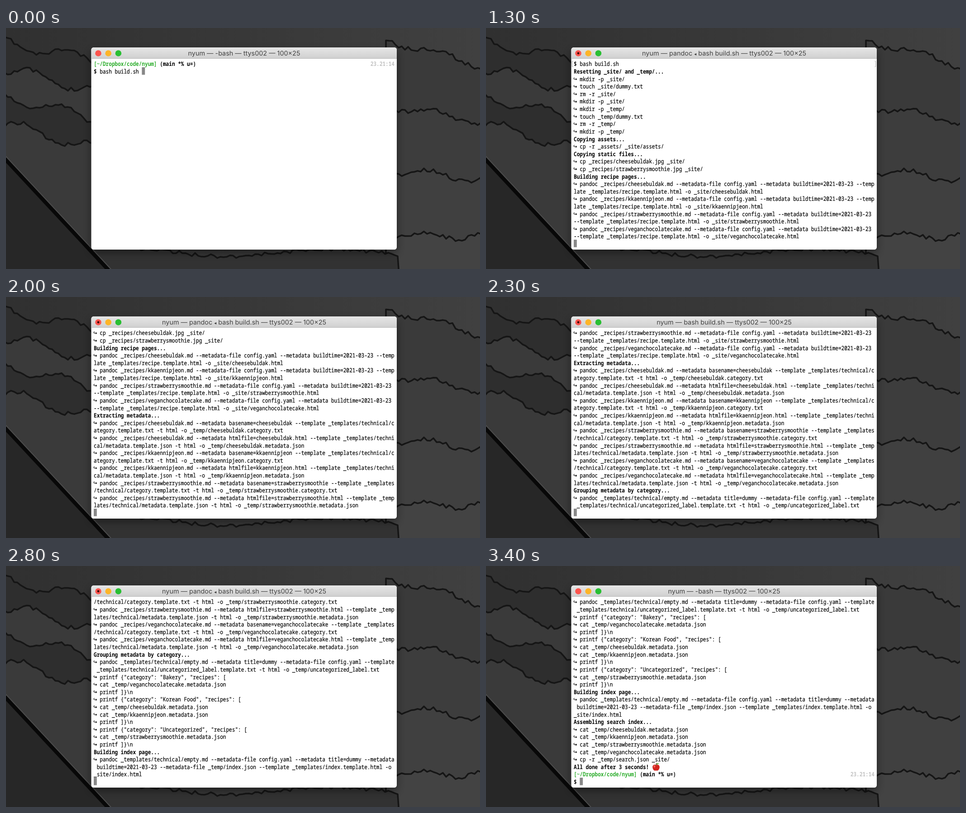
Animation, 1048 px wide and 534 px high, one loop 4400 ms. Source, as an HTML page:

```html
<!DOCTYPE html>
<html lang="en">
<head>
<meta charset="utf-8">
<title>Terminal build</title>
<style>
html, body { margin: 0; width: 100%; height: 100%; overflow: hidden; background: #353535; }
svg { display: block; width: 1048px; height: 534px; }
text { white-space: pre; text-rendering: geometricPrecision; }
#lines text { font: 11.083px "Noto Sans Mono", "DejaVu Sans Mono", monospace; fill: #000; stroke: #000; stroke-width: .18; }
#lines .bold, #lines .path, #lines .time { font-weight: 700; stroke: none; }
#lines .path { fill: #2fae2f; }
#lines .time { fill: #c2c2c2; }
#title { font: 14.4px Inter, Roboto, sans-serif; fill: #404040; text-anchor: middle; }
#title .tri { font: 10px "DejaVu Sans", sans-serif; }
</style>
</head>
<body>
<svg viewBox="0 0 1048 534" xmlns="http://www.w3.org/2000/svg">
  <defs>
    <linearGradient id="rock">
      <stop offset="0" stop-color="#303030"/>
      <stop offset="1" stop-color="#404040"/>
    </linearGradient>
    <linearGradient id="bar" x2="0" y2="1">
      <stop offset="0" stop-color="#e6e6e6"/>
      <stop offset="1" stop-color="#cfcfcf"/>
    </linearGradient>
    <filter id="blur" x="-10%" y="-10%" width="120%" height="125%">
      <feGaussianBlur stdDeviation="9"/>
    </filter>
  </defs>
  <rect width="1048" height="534" fill="url(#rock)"/>
  <g id="slabs" stroke-linejoin="round"></g>
  <rect x="188.5" y="51" width="675.5" height="446" rx="6" opacity=".45" filter="url(#blur)"/>
  <rect x="188.5" y="43" width="675.5" height="448" rx="5.5" fill="#fff"/>
  <path d="M188.5 68V48.5a5.5 5.5 0 0 1 5.5-5.5H858.5a5.5 5.5 0 0 1 5.5 5.5V68Z" fill="url(#bar)"/>
  <path d="M188.5 67.5H864" stroke="#b4b4b4"/>
  <g id="buttons"></g>
  <circle id="dot" cx="204" cy="56" r="2.4" fill="#3d0505"/>
  <text id="title" x="526.5" y="61.2"></text>
  <g id="lines"></g>
  <rect id="cursor" width="6.8" height="16.6" fill="#888"/>
</svg>
<script>
const NS = 'http://www.w3.org/2000/svg';
const $ = id => document.getElementById(id);
const LOOP = 4400, TICK = 100, COLS = 100, ROWS = 25;
const CW = 6.65, LH = 16.61, LEFT = 194, BASE = 84.4;

function add(parent, tag, attrs, text) {
  const el = document.createElementNS(NS, tag);
  for (const k in attrs) el.setAttribute(k, attrs[k]);
  if (text !== undefined) el.textContent = text;
  parent.appendChild(el);
  return el;
}

['#fc544d', '#fdb528', '#29bf33'].forEach((fill, i) =>
  add($('buttons'), 'circle', { cx: 204 + i * 22.2, cy: 56, r: 6.8, fill }));

// ---- rock backdrop: overlapping flat slabs with rough upper edges
let seed = 11;
const rand = () => (seed = (seed * 16807) % 2147483647) / 2147483647 - 0.5;

function slab(x0, y0, x1, y1, tone, wave) {
  let d = `M${x0} 560`;
  for (let x = x0; x <= x1; x += 7) {
    const f = (x - x0) / (x1 - x0);
    const y = y0 + (y1 - y0) * f + wave * Math.sin(f * 9 + y0) + rand() * 9;
    d += `L${x} ${y.toFixed(1)}`;
  }
  add($('slabs'), 'path', {
    d: d + `L${x1} 560Z`, fill: `rgb(${tone},${tone},${tone})`, stroke: '#151515', 'stroke-width': 3.5 });
}

for (let i = 0; i < 4; i++) {
  slab(-10, 30 + i * 60, 210, 75 + i * 65, i % 2 ? 58 : 46, 12);
  slab(840, 25 + i * 145, 1060, 85 + i * 125, 58 + i * 3, 8);
}
slab(180, 494, 870, 500, 50, 9);
add($('slabs'), 'path', { d: 'M-20 273L250 560H-20Z', fill: '#272727' });
add($('slabs'), 'path', { d: 'M-10 281L236 546', stroke: '#080808', 'stroke-width': 9 });
add($('slabs'), 'path', { d: 'M-10 274L243 546', stroke: '#4c4c4c', 'stroke-width': 2 });

// ---- transcript
const foods = ['cheesebuldak', 'kkaennipjeon', 'strawberrysmoothie', 'veganchocolatecake'];
const [cheese, kkaennip, berry, cake] = foods;
const tpl = '_templates/', tech = tpl + 'technical/';
const rows = [];
const idle = '-bash', self = 'bash build.sh';
let proc = self;

const head = s => rows.push({ s, proc, bold: true, first: true });
function run(cmd) {
  const s = '  ' + cmd, name = cmd.split(' ')[0];
  proc = name === 'printf' ? self : `${name} ◂ ${self}`;
  for (let i = 0; i < s.length; i += COLS) rows.push({ s: s.slice(i, i + COLS), proc, first: i === 0, arrow: i === 0 });
}
const pandoc = (file, rest) => run(`pandoc ${file}.md --metadata${rest}`);
const cat = name => run(`cat _temp/${name}.metadata.json`);
function reset(dir) {
  [`mkdir -p ${dir}`, `touch ${dir}dummy.txt`, `rm -r ${dir}`, `mkdir -p ${dir}`].forEach(run);
}
function group(label, names) {
  run(`printf {"category": "${label}", "recipes": [`);
  names.forEach(cat);
  run('printf ]}\\n');
}

rows.push({ prompt: true, first: true });
rows.push({ dollar: true, first: true, s: '  bash build.sh', proc: idle, marks: true });
head('Resetting _site/ and _temp/...');
reset('_site/');
reset('_temp/');
head('Copying assets...');
run('cp -r _assets/ _site/assets/');
head('Copying static files...');
[cheese, berry].forEach(n => run(`cp _recipes/${n}.jpg _site/`));
head('Building recipe pages...');
foods.forEach(n => pandoc('_recipes/' + n,
  `-file config.yaml --metadata buildtime=2021-03-23 --template ${tpl}recipe.template.html -o _site/${n}.html`));
head('Extracting metadata...');
foods.forEach(n => {
  pandoc('_recipes/' + n, ` basename=${n} --template ${tech}category.template.txt -t html -o _temp/${n}.category.txt`);
  pandoc('_recipes/' + n, ` htmlfile=${n}.html --template ${tech}metadata.template.json -t html -o _temp/${n}.metadata.json`);
});
head('Grouping metadata by category...');
pandoc(tech + 'empty', ` title=dummy --metadata-file config.yaml --template ${tech}uncategorized_label.template.txt -t html -o _temp/uncategorized_label.txt`);
group('Bakery', [cake]);
group('Korean Food', [cheese, kkaennip]);
group('Uncategorized', [berry]);
head('Building index page...');
pandoc(tech + 'empty', `-file config.yaml --metadata title=dummy --metadata buildtime=2021-03-23 --metadata-file _temp/index.json --template ${tpl}index.template.html -o _site/index.html`);
head('Assembling search index...');
foods.forEach(cat);
run('cp -r _temp/search.json _site/');
rows.push({ s: 'All done after 3 seconds!', first: true, bold: true, apple: true });
rows.push({ prompt: true, first: true });
rows.push({ dollar: true, first: true });
const LAST = rows.length - 1;

function apple(g) {
  const a = add(g, 'g', { transform: 'translate(182 -4.6)' });
  add(a, 'path', { d: 'M0-4C-3-6.2-8-4.6-7.8.6C-7.6 5-4.6 8.6-2.4 8.3Q0 7.6 2.4 8.3C4.6 8.6 7.6 5 7.8.6C8-4.6 3-6.2 0-4Z', fill: '#d3251f' });
  add(a, 'ellipse', { cx: -3.6, cy: -1.2, rx: 2, ry: 2.6, fill: '#f0695a' });
  add(a, 'path', { d: 'M0-3.4Q-.2-6.5 1.2-8.6', fill: 'none', stroke: '#6b3a1e', 'stroke-width': 1.3 });
  add(a, 'path', { d: 'M.4-5.4Q2-9.4 6.2-8Q4.4-4.6 .4-5.4Z', fill: '#5aa632' });
}

const lines = rows.map((r, i) => {
  const g = add($('lines'), 'g', { transform: `translate(0 ${i * LH})` });
  const put = (col, s, cls = '') =>
    add(g, 'text', { x: col * CW, y: 0, class: cls, transform: 'scale(1 1.2)' }, s);
  if (r.prompt) {
    put(0, '[~/Dropbox/code/nyum]', 'path');
    put(22, '(main *% u=)', 'bold');
    put(92, '23.21:14', 'time');
  }
  if (r.dollar) put(0, '$', 'bold');
  if (r.s) put(0, r.s, r.bold ? 'bold' : '');
  if (r.arrow) add(g, 'path', {
    d: 'M1.9-7.3H1.7a1.6 1.6 0 0 0 0 3.2H6.2M4.5-6L6.4-4.1L4.5-2.2',
    fill: 'none', stroke: '#000', 'stroke-width': 1.1 });
  if (r.marks) add(g, 'path', { id: 'marks',
    d: 'M-1.2-10.6h-2.2v12h2.2M665.6-10.6h2v12h-2', fill: 'none', stroke: '#aaa' });
  if (r.apple) apple(g);
  return g;
});

// ---- progress: time, rows finished, process name while it rests there
const sub = `bash ◂ ${self}`;
const keys = [
  [0, 1, idle], [400, 1, idle], [500, 2, idle], [700, 17], [900, 21], [1300, 25],
  [1500, 30], [1600, 30], [1700, 32, sub], [2300, 45, self], [2400, 45, self],
  [2800, 59], [2900, 59], [3100, LAST, self], [3400, LAST, idle], [LOOP, LAST, idle]
];

// Output appears one whole command at a time.
function progress(t) {
  const k = keys.findIndex(key => key[0] > t) - 1;
  const [t0, n0, name] = keys[k], [t1, n1] = keys[k + 1];
  let n = Math.floor(n0 + (n1 - n0) * (t - t0) / (t1 - t0) + 1e-6);
  while (!rows[n].first) n--;
  return [n, n === n0 && name || rows[n - 1].proc];
}

function setTitle(name) {
  const el = $('title');
  el.textContent = '';
  `nyum — ${name} — ttys002 — 100×25`.split(/(◂)/).forEach(s =>
    add(el, 'tspan', s === '◂' ? { class: 'tri' } : {}, s));
}

let shown = -1;
function draw(t) {
  const tick = Math.floor(t / TICK) * TICK;
  if (tick === shown) return;
  shown = tick;
  const [n, name] = progress(tick);
  const waiting = n === 1 || n === LAST;
  const top = Math.max(0, n - ROWS + 1);
  lines.forEach((g, i) => {
    const on = i >= top && (i < n || (waiting && i === n));
    g.setAttribute('display', on ? 'inline' : 'none');
  });
  $('lines').setAttribute('transform', `translate(${LEFT} ${BASE - top * LH})`);
  $('cursor').setAttribute('x', LEFT + CW * (n === 1 ? 16 : n === LAST ? 2 : 0));
  $('cursor').setAttribute('y', BASE - 14 + (n - top) * LH);
  $('marks').setAttribute('display', n > 1 ? 'inline' : 'none');
  $('dot').setAttribute('display', name === idle ? 'none' : 'inline');
  setTitle(name);
}

function frame() {
  draw(performance.now() % LOOP);
  requestAnimationFrame(frame);
}
frame();
</script>
</body>
</html>
```
